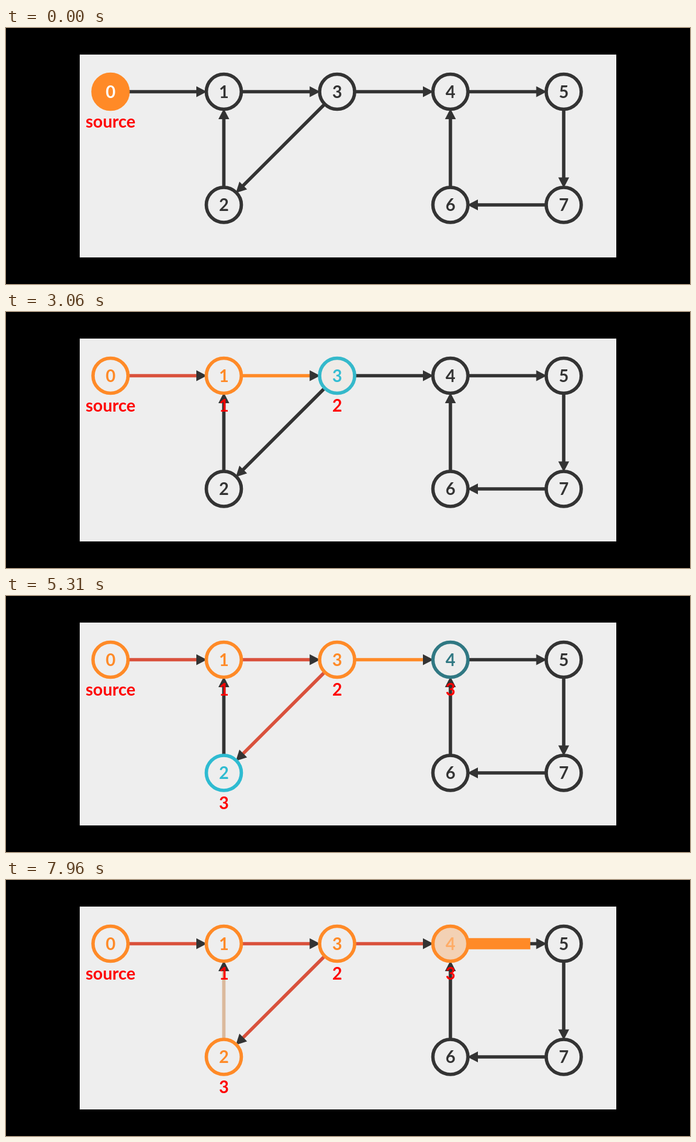
Write an HTML page with a canvas that moves like this. It is 1132 px wide and 424 px high and loops after 8000 ms.

```html
<!DOCTYPE html>
<html lang="en">
<head>
<meta charset="utf-8">
<title>Breadth-first search</title>
<style>
html, body { margin: 0; width: 100%; height: 100%; overflow: hidden; background: #000; }
canvas { display: block; }
</style>
</head>
<body>
<canvas id="stage" width="1132" height="424"></canvas>
<script>
const ctx = document.getElementById('stage').getContext('2d');
const LOOP = 8000, FADE = 500;

const PAPER = [238, 238, 238], DARK = [51, 51, 51], ORANGE = [255, 138, 39],
      BLUE = [46, 187, 209], RED = [217, 81, 60], GREY = [204, 204, 204], WHITE = [255, 255, 255];

// Node looks: fill, ring, text
const idle = [PAPER, DARK, DARK], queued = [PAPER, BLUE, BLUE],
      active = [ORANGE, ORANGE, WHITE], visited = [PAPER, ORANGE, ORANGE];

// Start time of each phase
const starts = [360, 880, 1400, 1920, 2440, 2960, 3485, 3995, 4545, 5060, 5575, 6075, 6575, 7110, 7670];

const X = [173, 360.5, 548, 735.5, 923], TOP = 105.5, LOW = 293;

// changes: [phase, look]; label: text, phase in which it appears
const nodes = [
  { x: X[0], y: TOP, first: active, changes: [[0, visited]], label: 'source', from: -1 },
  { x: X[1], y: TOP, changes: [[1, queued], [2, active], [3, visited]], label: '1', from: 1 },
  { x: X[1], y: LOW, changes: [[9, queued], [10, active], [11, visited]], label: '3', from: 7 },
  { x: X[2], y: TOP, changes: [[4, queued], [5, active], [6, visited]], label: '2', from: 4 },
  { x: X[3], y: TOP, changes: [[9, queued], [13, active], [14, visited]], label: '3', from: 9 },
  { x: X[4], y: TOP, changes: [] },
  { x: X[3], y: LOW, changes: [] },
  { x: X[4], y: LOW, changes: [] }
];
nodes[2].changes[0][0] = 7;

// grow: phase of the thick stroke; settle: phase of the final colour
const edges = [
  { a: 0, b: 1, grow: 0, settle: 3, color: RED },
  { a: 1, b: 3, grow: 3, settle: 6, color: RED },
  { a: 3, b: 2, grow: 6, settle: 8, color: RED },
  { a: 3, b: 4, grow: 8, settle: 11, color: RED },
  { a: 2, b: 1, grow: 11, settle: 14, color: GREY },
  { a: 4, b: 5, grow: 14 },
  { a: 5, b: 7 }, { a: 7, b: 6 }, { a: 6, b: 4 }
];

const rgb = c => `rgb(${c.map(Math.round)})`;
const mix = (a, b, p) => a.map((v, i) => v + (b[i] - v) * p);
const begun = (phase, t) => phase < 0 || t >= starts[phase];

// Cubic ease in and out
function progress(phase, t) {
  const u = Math.min(1, Math.max(0, (t - starts[phase]) / FADE));
  return u < .5 ? 4 * u ** 3 : 1 - 4 * (1 - u) ** 3;
}

function line(from, to, width, color) {
  ctx.strokeStyle = rgb(color);
  ctx.lineWidth = width;
  ctx.beginPath();
  ctx.moveTo(from, 0);
  ctx.lineTo(to, 0);
  ctx.stroke();
}

function drawEdge({ a, b, grow, settle, color }, t) {
  const p = nodes[a], q = nodes[b];
  const dx = q.x - p.x, dy = q.y - p.y, length = Math.hypot(dx, dy);
  let tint = DARK;
  if (grow + 1 < starts.length && begun(grow + 1, t)) {
    tint = mix(ORANGE, color, progress(settle, t));
  }
  ctx.save();
  ctx.translate(p.x, p.y);
  ctx.rotate(Math.atan2(dy, dx));
  line(30, length - 44, 5.6, tint);
  ctx.fillStyle = rgb(DARK);
  ctx.beginPath();
  ctx.moveTo(length - 45.5, -9);
  ctx.lineTo(length - 28, 0);
  ctx.lineTo(length - 45.5, 9);
  ctx.fill();
  if (grow !== undefined && begun(grow, t) && tint === DARK) {
    line(30, 31 + (length - 44.5) * progress(grow, t), 18.5, ORANGE);
  }
  ctx.restore();
}

function drawNode({ x, y, first = idle, changes }, i, t) {
  let look = first;
  for (const [phase, next] of changes) {
    const p = progress(phase, t);
    look = look.map((c, k) => mix(c, next[k], p));
  }
  ctx.beginPath();
  ctx.arc(x, y, 29, 0, 2 * Math.PI);
  ctx.fillStyle = rgb(look[0]);
  ctx.fill();
  ctx.strokeStyle = rgb(look[1]);
  ctx.lineWidth = 5.6;
  ctx.stroke();
  ctx.fillStyle = rgb(look[2]);
  ctx.fillText(i, x, y + 10);
}

function draw(now) {
  const t = now % LOOP;
  ctx.fillStyle = '#000';
  ctx.fillRect(0, 0, 1132, 424);
  ctx.fillStyle = rgb(PAPER);
  ctx.fillRect(122, 44, 888, 336);
  ctx.font = 'bold 28px Lato, sans-serif';
  ctx.textAlign = 'center';
  edges.forEach(e => drawEdge(e, t));
  nodes.forEach((n, i) => drawNode(n, i, t));
  ctx.fillStyle = '#f00';
  for (const n of nodes) {
    if (n.label && begun(n.from, t)) ctx.fillText(n.label, n.x, n.y + 59.5);
  }
}

const origin = performance.now();
function tick() {
  draw(performance.now() - origin);
  requestAnimationFrame(tick);
}
tick();
</script>
</body>
</html>
```
